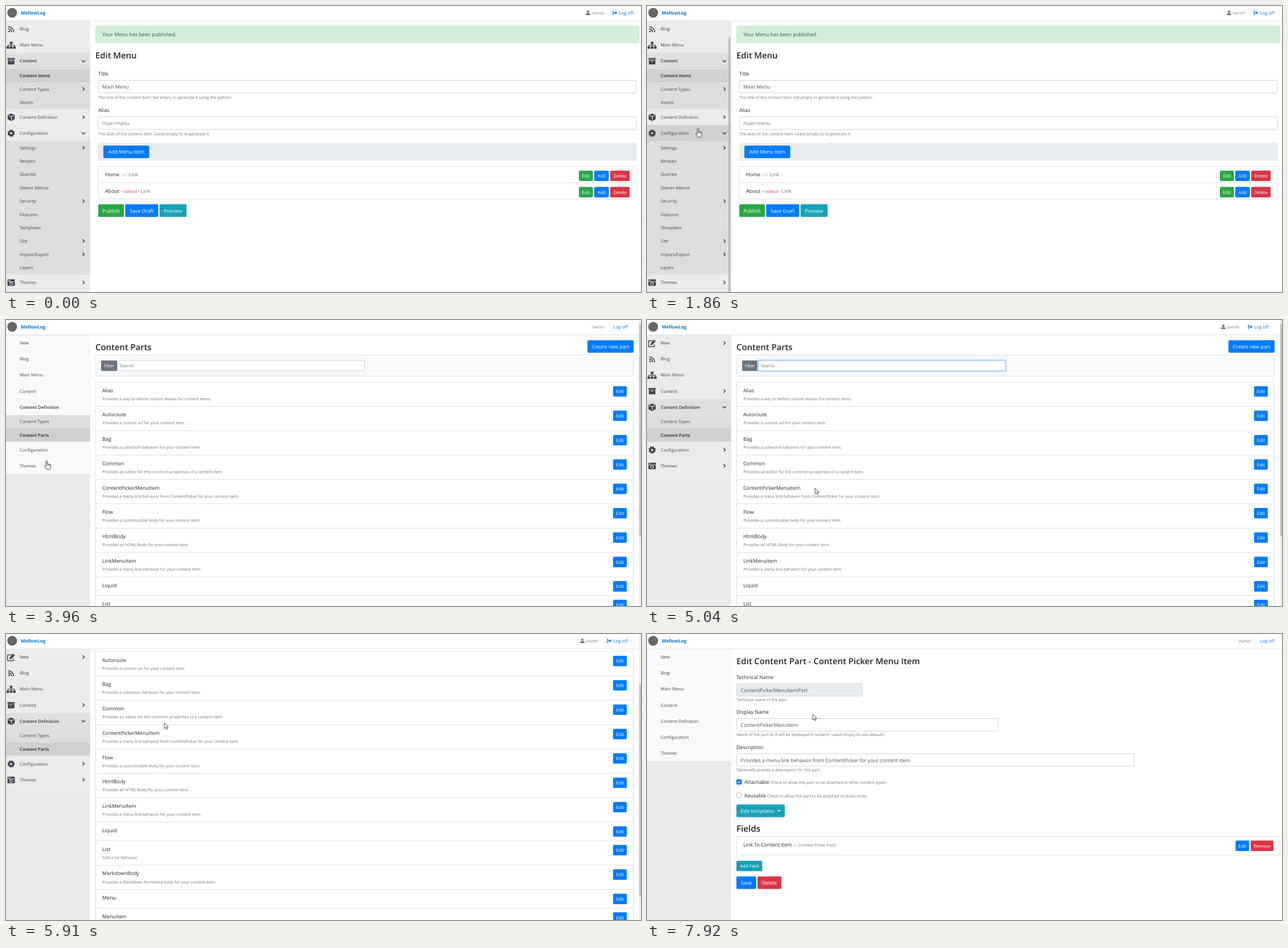
An HTML page that plays this animation: 1115 by 502 pixels, repeating every 7.99 s.

```html
<!DOCTYPE html>
<html lang="en">
<head>
<meta charset="utf-8">
<title>Content menu demo</title>
<style>
html, body { margin: 0; width: 100%; height: 100%; overflow: hidden; background: #fff; }
svg { display: block; width: 100vw; height: 100vh; }
text { font-family: "Open Sans", "Noto Sans", sans-serif; white-space: pre; text-rendering: geometricPrecision; }
.code { font-family: "Liberation Mono", monospace; }
</style>
</head>
<body>
<svg id="stage" viewBox="0 0 1115 502" xmlns="http://www.w3.org/2000/svg"></svg>
<script>
const LOOP = 7990;
const BODY = 8.85, MID = 7.77, SMALL = 7.1;
const BLUE = '#007bff', GREEN = '#28a745', RED = '#dc3545', TEAL = '#17a2b8';
const INK = '#212529', GREY = '#6c757d', FIELD = '#495057', ICON = '#3d4348';
const ROW = 28.1, SUB = 23.4, TOP = 26.4;

// basic shapes
const rect = (x, y, r, b, fill, rx = 0, extra = '') =>
  `<rect x="${x}" y="${y}" width="${r - x}" height="${b - y}" rx="${rx}" fill="${fill}" ${extra}/>`;
const line = (d, color, w = 1) => `<path d="${d}" fill="none" stroke="${color}" stroke-width="${w}"/>`;
const text = (x, cy, s, size = BODY, fill = INK, extra = '') =>
  `<text x="${x}" y="${cy + size * 0.357}" font-size="${size}" fill="${fill}" ${extra}>${s}</text>`;
const span = (s, size, fill, cls = '') => `<tspan class="${cls}" font-size="${size}" fill="${fill}">${s}</tspan>`;
const heading = (x, cy, s, size = 14.85) => text(x, cy, s, size, INK, 'font-weight="600"');
const help = (x, cy, s) => text(x, cy, s, SMALL, GREY);
const button = (x, y, r, b, s, color, size = BODY) =>
  rect(x, y, r, b, color, 2) + text((x + r) / 2, (y + b) / 2 + 0.2, s, size, '#fff', 'text-anchor="middle"');
const box = (x, y, r, b, fill = '#fff', color = '#ced4da') =>
  rect(x + 0.5, y + 0.5, r - 0.5, b - 0.5, fill, 2, `stroke="${color}"`);
const input = (x, y, r, b, s, fill, color = FIELD) => box(x, y, r, b, fill) + text(x + 7.6, (y + b) / 2 + 0.7, s, BODY, color);

// motion
const ease = p => p * p * (3 - 2 * p);
function track(keys, t) {
  if (t <= keys[0][0]) return keys[0].slice(1);
  for (let i = 1; i < keys.length; i++) {
    const [a, b] = [keys[i - 1], keys[i]];
    if (t <= b[0]) {
      const p = ease((t - a[0]) / (b[0] - a[0]));
      return a.slice(1).map((v, k) => v + (b[k + 1] - v) * p);
    }
  }
  return keys[keys.length - 1].slice(1);
}

const pointerPath = [
  [220, 1060, 330], [600, 130, 445], [760, 130, 445], [1310, 100, 395], [1540, 100, 395],
  [1860, 89.5, 216], [2030, 87, 195], [2270, 87, 195], [2330, 86.5, 191.5], [2900, 86.5, 191.5],
  [3500, 71.5, 248], [4430, 71.5, 248], [5040, 295, 295], [5280, 288, 230], [5910, 278, 156],
  [6130, 280, 165], [6200, 280, 165], [6600, 690, 203], [6980, 1088, 184], [7060, 1082, 181],
  [7140, 1080.5, 179.5], [7540, 1080.5, 179.5], [7920, 291, 141]
];
const scrollPath = [[5300, 0], [5910, 120.8], [5980, 120.8], [6130, 117.2]];
const clicks = [[2500, 2730], [3650, 3790], [7140, 7440]];
const within = (t, [a, b]) => t >= a && t < b;

// sidebar icons, centred on 0,0
const icons = {
  edit: line('M2 -4.2H-5.2Q-6.3 -4.2 -6.3 -3.1V4.9Q-6.3 6 -5.2 6H2.8Q3.9 6 3.9 4.9V2', ICON, 1.5) +
    `<path d="M-3 3.2L-2.6 .4L4 -6.2L6.8 -3.4L.2 3L-3 3.2Z" fill="${ICON}"/>` + line('M2.6 -4.9L5.4 -2.1', '#eaebeb', 0.8),
  rss: `<circle cx="-3.7" cy="3.7" r="1.5" fill="${ICON}"/>` +
    line('M-5.2 -.6A5.9 5.9 0 0 1 .7 5.2M-5.2 -4.3A9.5 9.5 0 0 1 4.4 5.2', ICON, 1.8),
  tree: `<path d="M-2.3 -6.2h4.6v4h-4.6zM-8 2.2h4.6v4h-4.6zM-2.3 2.2h4.6v4h-4.6zM3.4 2.2h4.6v4h-4.6z" fill="${ICON}"/>` +
    line('M0 -3V3M-5.7 3V0H5.7V3', ICON, 1.2),
  archive: rect(-6.5, -5.5, 6.5, -2.6, ICON, 0.5) + rect(-5.7, -1.8, 5.7, 5.5, ICON, 0.6) + rect(-2, -0.4, 2, 0.8, '#ddd', 0.4),
  cube: `<path d="M0 -6.4L6.2 -3.8V3.6L0 6.6L-6.2 3.6V-3.8Z" fill="${ICON}"/>` + line('M-4.8 -3L0 -1.1L4.8 -3M.6 -.8V5', '#e4e4e4', 1.2),
  cog: `<circle r="3.5" fill="none" stroke="${ICON}" stroke-width="3.2"/>` +
    `<circle r="5.4" fill="none" stroke="${ICON}" stroke-width="2" stroke-dasharray="2.5 1.741"/>`,
  camera: rect(-6.5, -5.7, 6.5, 5.9, ICON, 1) + rect(-5.3, -4.4, -1.8, -3.4, '#ddd') + line('M-6.5 -1.9H6.5', '#ddd', 0.9) +
    '<circle cy="1.9" r="2.5" fill="#3d4348" stroke="#ddd" stroke-width="1.1"/>'
};
const at = (x, y, s) => `<g transform="translate(${x} ${y})">${s}</g>`;
const chevron = (cy, open) =>
  at(136, cy, line(open ? 'M-3 -1.4L0 1.6L3 -1.4' : 'M-1.5 -3L1.5 0L-1.5 3', ICON, 1.4));

// label, icon, has children, children (a trailing ">" marks a nested group)
const menu = [
  ['New', 'edit', 1, []],
  ['Blog', 'rss', 0, []],
  ['Main Menu', 'tree', 0, []],
  ['Content', 'archive', 1, ['Content Items', 'Content Types>', 'Assets']],
  ['Content Definition', 'cube', 1, ['Content Types', 'Content Parts']],
  ['Configuration', 'cog', 1, ['Settings>', 'Recipes', 'Queries', 'Owner Menus', 'Security>', 'Features',
    'Templates', 'Site>', 'Import/Export>', 'Layers']],
  ['Themes', 'camera', 1, []]
];

// open: label -> share of the group that is unfolded
function sidebar({ open = {}, active, current, shift = 0, ready = true, px = 999, py = 0 }) {
  let y = TOP - shift, out = '';
  const hover = (a, b) => ready && px < 147 && py >= a && py < b;
  for (const [label, icon, group, kids] of menu) {
    const on = label === active, part = open[label] || 0, mid = y + ROW / 2;
    const fill = hover(y, y + ROW) ? '#cfd0d0' : !ready ? '#f8f9fa' : on ? '#dfdfdf' : '#eaebeb';
    out += rect(0, y, 147.5, y + ROW, fill) +
      text(24, mid, label, MID, on ? '#343a40' : '#444b50', on ? 'font-weight="600"' : '');
    if (ready) out += at(9, mid + 0.3, icons[icon]) + (group ? chevron(mid, part > 0) : '');
    y += ROW;
    const end = y + kids.length * SUB * part;
    if (part) {
      kids.forEach((kid, i) => {
        const a = y + i * SUB, b = Math.min(a + SUB, end), sel = kid === current && on;
        if (a >= end) return;
        out += rect(0, a, 147.5, b, sel || hover(a, b) ? '#cfd0d0' : '#dcdddd');
        if (b - a < SUB * 0.7) return;
        out += text(24, a + SUB / 2, kid.replace('>', ''), MID, sel ? INK : '#444b50', sel ? 'font-weight="600"' : '');
        if (kid.endsWith('>')) out += chevron(a + SUB / 2, false);
      });
    }
    y = end;
  }
  return rect(0, 26, 147.5, 502, '#e9e9e9') + out;
}

function header(right, ready) {
  let out = rect(0, 0, 1115, 26, '#fff') + line('M0 26.2H1115', '#dcdfe2') +
    '<circle cx="10.8" cy="11.8" r="8.6" fill="#666"/>' +
    text(26, 12, 'MellowLog', 8.1, '#0078d4', 'font-weight="700"') +
    text(right - 25.8, 12.5, 'Log off', 7.9, BLUE) +
    text(right - (ready ? 74 : 63.4), 12.5, 'owner', MID, '#868e96');
  if (ready) {
    out += at(right - 80, 12, `<circle cy="-2" r="2.1" fill="${GREY}"/><path d="M-3.8 4V2.5Q-3.8 .6 -1.8 .6H1.8Q3.8 .6 3.8 2.5V4Z" fill="${GREY}"/>`) +
      at(right - 33, 12, line('M-1 -3H-3.2V3H-1', BLUE, 1.2) + `<path d="M-1.6 -1H.9V-3L4.2 0L.9 3V1H-1.6Z" fill="${BLUE}"/>`);
  }
  return out;
}

// pages
function menuPage() {
  const item = (y, name, path) =>
    text(174, y + 14.6, `${name} ${span(path, 7.2, RED, 'code')}${span('- Link', BODY, GREY)}`) +
    button(1006, y + 7.3, 1030.5, y + 25.7, 'Edit', GREEN, MID) +
    button(1033, y + 7.3, 1058.5, y + 25.7, 'Add', BLUE, MID) +
    button(1061, y + 7.3, 1095, y + 25.7, 'Delete', RED, MID);
  return box(157, 35, 1112, 65, '#d4edda', '#c3e6cb') + text(169, 50, 'Your Menu has been published.', BODY, '#2b5a3a') +
    heading(157, 86.6, 'Edit Menu') +
    text(162, 119, 'Title') + input(161.5, 130, 1107.5, 153, 'Main Menu') +
    help(162, 160.3, 'The title of the content item. Set empty to generate it using the pattern.') +
    text(162, 183.3, 'Alias') + input(161.5, 194, 1107.5, 217, 'main-menu', '#fff', GREY) +
    help(162, 224.8, 'The alias of the content item. Leave empty to re-generate it.') +
    rect(162, 240, 1107.5, 271.5, '#e9ecef') + button(171, 245, 251.5, 267, 'Add Menu Item', BLUE) +
    box(161.5, 281, 1107.5, 339.5, '#fff', '#dfdfdf') + line('M162 310.2H1107', '#dfdfdf') +
    item(281.6, 'Home', '~/') + item(310.2, 'About', '~/about') +
    button(162, 348, 207, 370.3, 'Publish', GREEN) + button(209.3, 348, 267.3, 370.3, 'Save Draft', BLUE) +
    button(269.6, 348, 317, 370.3, 'Preview', TEAL);
}

const parts = [
  ['Alias', 'Provides a way to define custom aliases for content items.'],
  ['Autoroute', 'Provides a custom url for your content item.'],
  ['Bag', 'Provides a collection behavior for your content item.'],
  ['Common', 'Provides an editor for the common properties of a content item.'],
  ['ContentPickerMenuItem', 'Provides a menu link behavior from ContentPicker for your content item.'],
  ['Flow', 'Provides a customizable body for your content item.'],
  ['HtmlBody', 'Provides an HTML Body for your content item.'],
  ['LinkMenuItem', 'Provides a menu link behavior for your content item.'],
  ['Liquid', ''],
  ['List', 'Add a list behavior.'],
  ['MarkdownBody', 'Provides a Markdown formatted body for your content item.'],
  ['Menu', ''],
  ['MenuItem', '']
];

function partsPage(scroll, focused, hot, pressed) {
  let y = 108.8, out = '';
  for (const [name, about] of parts) {
    const h = about ? 42.77 : 32.75, pick = name === 'ContentPickerMenuItem';
    out += line(`M157 ${y}H1102`, '#dfdfdf') + text(169, y + 14.6, name) + help(169.3, y + 29.3, about);
    if (pick && pressed) out += rect(1064, y + 5.5, 1092, y + 27.5, '#80bdff', 3.5);
    out += button(1066, y + 7.4, 1090, y + 25.7, 'Edit', pick && pressed ? '#0062cc' : pick && hot ? '#0069d9' : BLUE, MID);
    y += h;
  }
  out += line(`M157.5 109V${y}M1101.5 109V${y}`, '#dfdfdf');
  const top = heading(157, 47.2, 'Content Parts') + button(1021, 35.5, 1102, 57.5, 'Create new part', BLUE) +
    box(157, 61, 1102, 99, '#f8f9fa', '#dfdfdf') + rect(167, 71, 195.5, 89.5, GREY, 2) +
    text(181, 80.3, 'Filter', MID, '#fff', 'text-anchor="middle"') +
    (focused ? rect(193.5, 69.3, 631.5, 91, '#bfdeff', 2.5) : '') +
    box(195, 70.6, 630, 89.8, '#fff', focused ? '#80bdff' : '#ced4da') + text(199.7, 80.3, 'Search', MID, GREY);
  const thumb = 7 + scroll * 0.67;
  return `<g transform="translate(0 ${-scroll})">${top}${out}</g>` +
    rect(1111.3, 0, 1115, 502, '#f1f1f1') + rect(1111.8, thumb, 1115, thumb + 373, '#c1c1c1');
}

function partPage() {
  return heading(157, 47.6, 'Edit Content Part - Content Picker Menu Item') +
    text(157, 75.6, 'Technical Name') + input(157, 86.5, 378.5, 109.5, 'ContentPickerMenuItemPart', '#e9ecef') +
    help(157, 115, 'Technical name of the part.') +
    text(157, 137, 'Display Name') + input(157, 148, 617, 171, 'ContentPickerMenuItem') +
    help(157, 176.8, 'Name of the part as it will be displayed in screens. Leave empty to use defaults.') +
    text(157, 198.6, 'Description') +
    input(157, 209.5, 856, 232.3, 'Provides a menu link behavior from ContentPicker for your content item.') +
    help(157, 238.4, 'Optionally provide a description for this part.') +
    rect(157, 255, 166.5, 264.3, BLUE, 2) + line('M159.6 259.8L161.2 261.4L164.2 257.8', '#fff', 1.3) +
    text(171, 260, 'Attachable ' + span('Check to allow this part to be attached to other content types.', SMALL, GREY)) +
    box(157, 278.3, 166.5, 287.7, '#fff', '#adb5bd') +
    text(171, 283.5, 'Reusable ' + span('Check to allow this part to be attached multiple times.', SMALL, GREY)) +
    rect(157, 299.3, 242, 321.6, TEAL, 2) + text(164.5, 310.7, 'Edit templates', BODY, '#fff') +
    '<path d="M228.8 309H234.4L231.6 311.9Z" fill="#fff"/>' +
    heading(157, 342, 'Fields', 15.2) + box(157, 355, 1112, 388.5, '#fff', '#dfdfdf') +
    text(169, 370.2, 'Link To Content Item ' + span('— Content Picker Field', SMALL, GREY)) +
    button(1033.5, 362.6, 1057.5, 381, 'Edit', BLUE, MID) + button(1060, 362.6, 1100, 381, 'Remove', RED, MID) +
    button(157, 398, 202.3, 416.2, 'Add Field', TEAL, MID) +
    button(157, 425.5, 191.7, 447.6, 'Save', BLUE) + button(194, 425.5, 236, 447.6, 'Delete', RED);
}

const hand = '<path d="M-1.2 .2a1.2 1.2 0 0 1 2.4 0V5q.9 -.8 2 .1q1 -.6 2 .3q1.3 -.3 1.4 1V10q0 2.5 -1.2 4.2H.2q-2 -2.5 -4 -5.5q.2 -1.6 2.6 -.2Z" fill="#fff" stroke="#222" stroke-width=".9"/>' +
  line('M1.2 5V7.4M3.2 5.2V7.4M5.2 5.5V7.4', '#222', 0.7);
const arrow = '<path d="M0 0V10L2.4 7.8L4 11.3L5.6 10.6L4.1 7.2H7.2Z" fill="#fff" stroke="#222" stroke-width=".8"/>';

function pointer(t, x, y, hot) {
  const ring = clicks.some(c => within(t, c)) ? '<circle r="7.2" fill="#e6dc00" opacity=".75"/>' : '';
  return t < 220 ? '' : at(x, y, ring + (hot ? hand : arrow));
}

const firstPage = menuPage(), lastPage = partPage();

function draw(t) {
  const [px, py] = track(pointerPath, t);
  let hot = px < 147, out;
  if (t < 3960) {
    const unfold = ease(Math.min(1, Math.max(0, (t - 2730) / 300)));
    out = firstPage + sidebar({
      open: { Content: 1, 'Content Definition': unfold, Configuration: 1 },
      active: 'Content', current: 'Content Items', shift: ROW, px: t < 220 ? 999 : px, py
    }) + (t >= 760 ? rect(143, 54, 146.6, 502, '#bbb', 1.5) : '') + header(1102, true);
  } else if (t < 7915) {
    const ready = t >= 4030, [scroll] = track(scrollPath, t);
    const over = t > 6200 && px > 1066 && px < 1090 && py > 169 && py < 189;
    hot = hot || over;
    out = partsPage(scroll, ready, over, t >= 7140) + sidebar({
      open: { 'Content Definition': 1 }, active: 'Content Definition', current: 'Content Parts', ready, px, py
    }) + header(1092, ready) + rect(1111.3, 0, 1115, 27, '#f1f1f1');
    out += rect(1111.8, 7 + scroll * 0.67, 1115, Math.max(27, 7 + scroll * 0.67), '#c1c1c1');
  } else {
    out = lastPage + sidebar({ ready: false }) + header(1102, false);
  }
  return out + pointer(t, px, py, hot);
}

const stage = document.getElementById('stage');
let shown = '';
function tick() {
  const next = draw(performance.now() % LOOP);
  if (next !== shown) stage.innerHTML = shown = next;
  requestAnimationFrame(tick);
}
tick();
</script>
</body>
</html>
```
